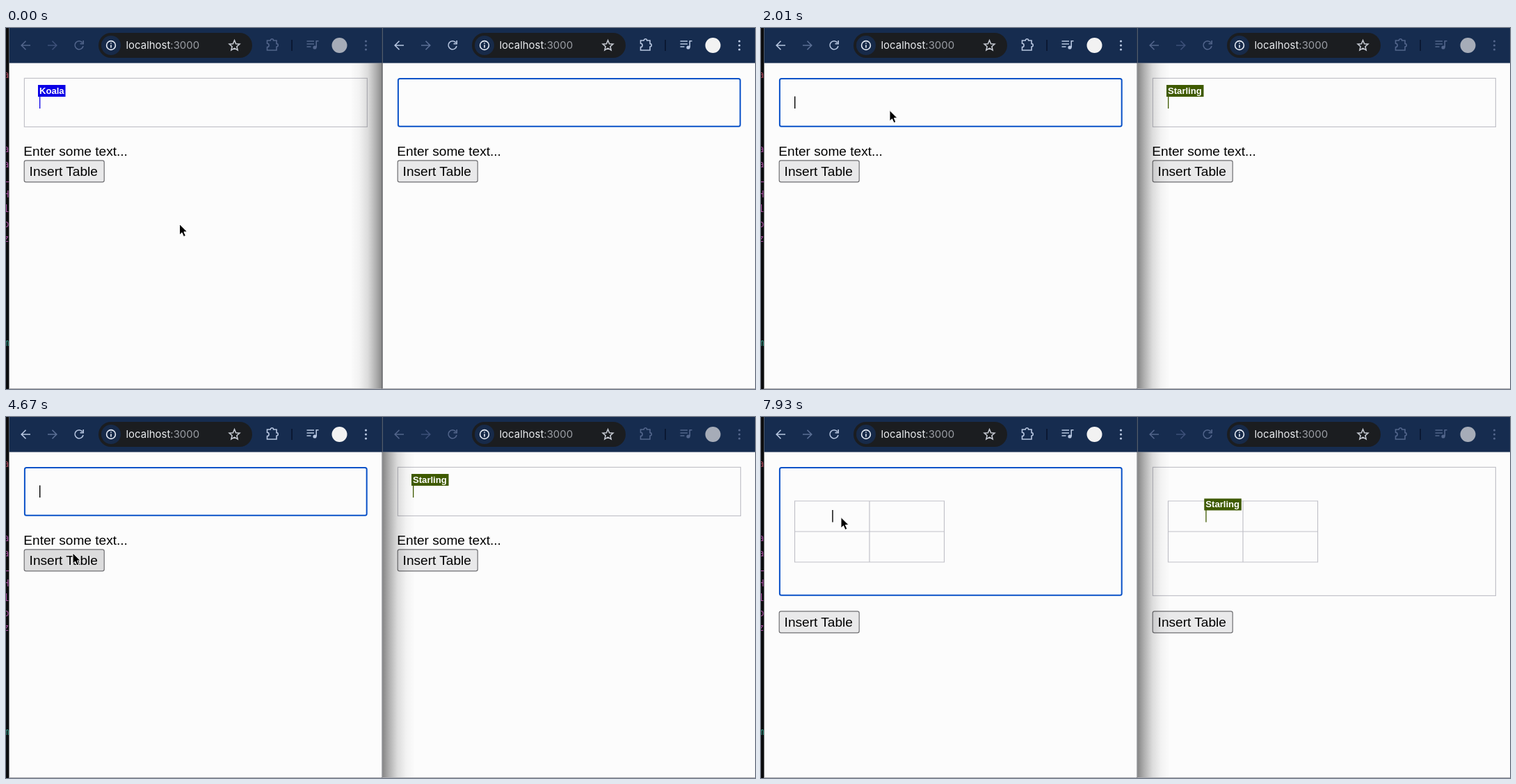
An HTML page that plays this animation: 1077x520 px, repeating every 8 s.

```html
<!DOCTYPE html>
<html lang="en">
<head>
<meta charset="utf-8">
<title>Shared editor</title>
<style>
  html, body { margin: 0; width: 100%; height: 100%; overflow: hidden; background: #0b0c0e; }
  svg { display: block; width: 100vw; height: 100vh; }
  text { font-kerning: none; white-space: pre; }
  .page { font: 19.1px "Liberation Sans", Arial, sans-serif; }
  .url { font: 14.95px Inter, Roboto, sans-serif; }
  .name { font: bold 13.1px "Liberation Sans", Arial, sans-serif; fill: #fff; }
  .code { font: 14px "Noto Sans Mono", "DejaVu Sans Mono", monospace; }
  .icon { fill: none; stroke-width: 1.6; }
</style>
</head>
<body>
<svg id="stage" viewBox="0 0 1077 520" preserveAspectRatio="none">
  <defs>
    <linearGradient id="shade">
      <stop offset="0" stop-opacity=".46"/>
      <stop offset=".2" stop-opacity=".3"/>
      <stop offset=".45" stop-opacity=".13"/>
      <stop offset=".72" stop-opacity=".04"/>
      <stop offset="1" stop-opacity="0"/>
    </linearGradient>
    <clipPath id="strip"><rect width="4.5" height="520"/></clipPath>
  </defs>
</svg>
<script>
const LOOP = 8000;
const ACTIVATE = 500, FOCUS = 1650, INSERT = 4850;
const OFFSET = 537;
const NAVY = "#162c4f", BORDER = "#c2c2c9", RING = "#0a52c8";

// Pointer stops: time, x, y
const POINTER = [
  [0, 249.5, 282.5], [640, 249.5, 282.5], [1170, 242.4, 137.2], [1260, 242.4, 137.2],
  [1580, 185, 118.6], [2800, 185, 118.6], [3600, 96, 195.8],
  [7050, 96, 195.8], [7700, 115, 144.4], [LOOP, 115, 144.4]
];

const stage = document.getElementById("stage");

function add(parent, tag, attrs = {}, text = "") {
  const node = document.createElementNS("http://www.w3.org/2000/svg", tag);
  set(node, attrs);
  if (text) node.textContent = text;
  parent.appendChild(node);
  return node;
}

function set(node, attrs) {
  for (const key in attrs) node.setAttribute(key, attrs[key]);
}

function show(node, visible) {
  node.setAttribute("visibility", visible ? "visible" : "hidden");
}

const box = (parent, x, y, width, height, attrs) =>
  add(parent, "rect", { x, y, width, height, ...attrs });

function drawTerminal() {
  const strip = add(stage, "g", { "clip-path": "url(#strip)" });
  const glyphs = [["a", 72], ["a", 179], ["a", 201], ["_", 220], ["H", 244],
    ["l", 265], ["o", 287], ["z", 308], ["m", 458]];
  for (const [glyph, y] of glyphs) {
    const fill = glyph === "m" ? "#2f9c86" : y < 100 ? "#b0485a" : "#a44b9c";
    add(strip, "text", { x: -4, y, class: "code", fill }, glyph);
  }
}

function drawToolbar(g) {
  const parts = {};
  const icon = (d, attrs = {}) => add(g, "path", { d, class: "icon", ...attrs });
  parts.back = icon("M35 25H22.5M28.5 18.7L22.2 25L28.5 31.3");
  parts.forward = icon("M60 25H72.5M66.5 18.7L72.8 25L66.5 31.3");
  parts.reload = icon("M109.8 21A6 6 0 1 0 111 26M111.2 18V22.6H106.6");

  box(g, 133, 7, 221, 36, { rx: 18, fill: "#1b1d20" });
  add(g, "circle", { cx: 151, cy: 25, r: 14, fill: "#172a49" });
  add(g, "circle", { cx: 151, cy: 25, r: 6.4, class: "icon", stroke: "#e6ebf5" });
  icon("M151 24.3V28.6M151 21.2V22.8", { stroke: "#e6ebf5" });
  const url = add(g, "text", { x: 172.5, y: 30.3, class: "url", fill: "#e9ebee" });
  add(url, "tspan", {}, "localhost");
  add(url, "tspan", { fill: "#9a9da3" }, ":3000");
  icon("M328.5 17.8L330.6 22.7L335.9 23.2L331.9 26.7L333.1 31.9L328.5 29.1L323.9 31.9L325.1 26.7L321.1 23.2L326.4 22.7Z",
    { stroke: "#c6cad2", "stroke-width": 1.4 });

  parts.puzzle = icon("M375.5 18H380.2A2.2 2.2 0 0 1 384.6 18H389V22.6A2.2 2.2 0 0 1 389 27V32H375.5V27.5A2.6 2.6 0 0 0 375.5 22.3Z");
  box(g, 410.2, 17, 1.8, 16, { fill: "#0a1730" });
  parts.queue = icon("M432.5 19H443M432.5 23H443M432.5 27H438.5M446.2 28V18.8H449.5");
  parts.note = add(g, "circle", { cx: 444, cy: 28, r: 2.6 });
  parts.avatar = add(g, "circle", { cx: 479.5, cy: 25, r: 11 });
  parts.dots = [19, 25, 31].map(cy => add(g, "circle", { cx: 517.5, cy, r: 1.6 }));

  return active => {
    const tone = active ? "#b7c6e0" : "#52658b";
    for (const key of ["back", "reload", "puzzle", "queue"]) set(parts[key], { stroke: tone });
    set(parts.forward, { stroke: active ? "#5b6f95" : "#3d5079" });
    for (const dot of [parts.note, ...parts.dots]) set(dot, { fill: tone });
    set(parts.avatar, { fill: active ? "#f2f2f2" : "#a6acb8" });
  };
}

function drawLabel(g, name, width, color) {
  const label = add(g, "g");
  box(label, 46, 82, width, 17, { fill: color });
  box(label, 48, 98, 1.3, 18, { fill: color });
  add(label, "text", { x: 48, y: 94.7, class: "name" }, name);
  return label;
}

function drawWindow(offset, name, nameWidth, nameColor) {
  const g = add(stage, "g", { transform: `translate(${offset} 0)` });
  box(g, 4.5, 0, 536.5, 520, { fill: "#fcfcfc" });
  box(g, 4.5, 0, 536.5, 50.5, { fill: NAVY });
  const paintToolbar = drawToolbar(g);

  const editor = add(g, "rect", { fill: "none" });
  const table = add(g, "path", {
    d: "M48.5 121H263.5V209H48.5ZM156 121V209M48.5 165H263.5",
    fill: "none", stroke: BORDER, "stroke-width": 1.2
  });
  const hint = add(g, "text", { x: 25.3, y: 184, class: "page" }, "Enter some text...");
  const button = add(g, "g");
  const face = box(button, 26.2, 190.8, 115, 31, { rx: 2.6, stroke: "#6f6f72", "stroke-width": 1.2 });
  add(button, "text", { x: 33.6, y: 213.2, class: "page" }, "Insert Table");
  const caret = add(g, "rect", { width: 1.4, height: 17.5 });
  const label = drawLabel(g, name, nameWidth, nameColor);

  const isLeft = offset === 0;
  const shadow = box(g, isLeft ? 495 : 5, 50.5, 46, 469.5, {
    fill: "url(#shade)",
    transform: isLeft ? "rotate(180 518 285.25)" : ""
  });
  box(g, 4.5, 519, 537, 1, { fill: "#a9a9ad" });
  box(g, 540.5, 0, 1.1, 520, { fill: "#3c4048", opacity: isLeft ? .8 : .4 });

  return ({ active, focused, inserted, labelled, blinkOn, hover }) => {
    paintToolbar(active);
    show(shadow, !active);
    const height = inserted ? 185 : 70;
    set(editor, focused
      ? { x: 26.9, y: 73, width: 491.8, height: height - 1.2, rx: 2.5, stroke: RING, "stroke-width": 2 }
      : { x: 26.4, y: 72.4, width: 493, height, rx: 0, stroke: BORDER, "stroke-width": 1.2 });
    show(table, inserted);
    show(hint, !inserted);
    set(button, { transform: `translate(0 ${inserted ? 89 : 0})` });
    set(face, { fill: hover ? "#dcdcdd" : "#e9e9ea" });
    set(caret, { x: inserted ? 102.3 : 48, y: inserted ? 134 : 98.5 });
    show(caret, focused && blinkOn);
    set(label, { transform: inserted ? "translate(54.3 35.5)" : "" });
    show(label, labelled);
  };
}

function drawPointer() {
  const arrow = add(stage, "path", {
    d: "M0 0V15.6L3.5 12.3L6 18L8.9 16.8L6.4 11.2H11.2Z",
    fill: "#000", stroke: "#fff", "stroke-width": 1
  });
  const beam = add(stage, "g", { fill: "none" });
  const d = "M-3.6 -8Q0 -8 0 -5V6Q0 9 -3.6 9M3.6 -8Q0 -8 0 -5M0 6Q0 9 3.6 9M-2.2 3.2H2.2";
  add(beam, "path", { d, stroke: "#fff", "stroke-width": 3 });
  add(beam, "path", { d, stroke: "#111", "stroke-width": 1.3 });
  return (x, y, asBeam) => {
    const transform = `translate(${x} ${y})`;
    set(arrow, { transform });
    set(beam, { transform });
    show(arrow, !asBeam);
    show(beam, asBeam);
  };
}

function pointerAt(t) {
  const next = Math.max(1, POINTER.findIndex(([time]) => time > t));
  const [t0, x0, y0] = POINTER[next - 1];
  const [t1, x1, y1] = POINTER[next];
  const u = (t - t0) / (t1 - t0);
  const ease = u * u * (3 - 2 * u);
  return [x0 + (x1 - x0) * ease, y0 + (y1 - y0) * ease];
}

drawTerminal();
const paintLeft = drawWindow(0, "Koala", 39.5, "#0a00e6");
const paintRight = drawWindow(OFFSET, "Starling", 53.5, "#3f5a00");
const paintPointer = drawPointer();

function render(t) {
  const leftActive = t >= ACTIVATE;
  const focused = t >= FOCUS;
  const inserted = t >= INSERT;
  const [x, y] = pointerAt(t);
  const blinkOn = (t - (inserted ? INSERT : FOCUS)) % 1000 < 500;
  const hover = !inserted && x > 26 && x < 142 && y > 190 && y < 222;

  paintLeft({ active: leftActive, focused, inserted, labelled: !leftActive, blinkOn, hover });
  paintRight({
    active: !leftActive, focused: !leftActive, inserted,
    labelled: focused, blinkOn: false, hover: false
  });
  paintPointer(x, y, t >= INSERT + 80 && t < 5500);
}

const start = performance.now();
function tick() {
  render((performance.now() - start) % LOOP);
  requestAnimationFrame(tick);
}
tick();
</script>
</body>
</html>
```
